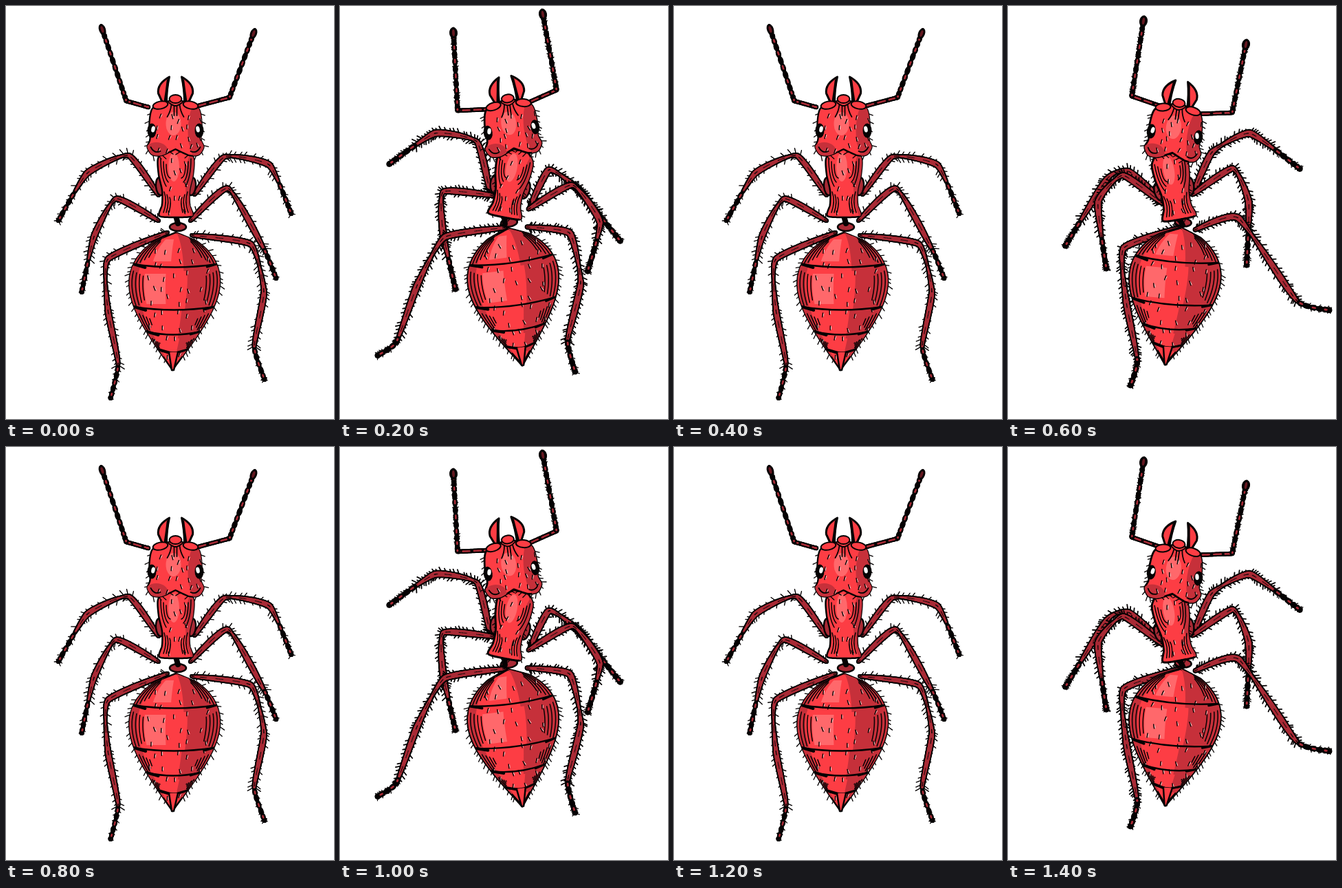
Write an HTML page with a canvas that moves like this. It is 477 by 600 pixels and loops after 1.6 s.

```html
<!DOCTYPE html>
<html lang="en">
<head>
<meta charset="utf-8">
<title>Walking ant</title>
<style>
html, body { margin: 0; width: 100%; height: 100%; overflow: hidden; background: #fff; }
canvas { display: block; }
</style>
</head>
<body>
<canvas id="stage" width="477" height="600"></canvas>
<script>
const g = document.getElementById('stage').getContext('2d');
const RED = '#fd3d44', DARK = '#c6303a', LIGHT = '#ff686b', LEG = '#a92b36', INK = '#050203';
const STEP = 200, ORDER = [0, 1, 0, 2], FOOT = 48;

// Body parts are [x, y, degrees]; limbs list their joints from the body to the tip.
const poses = [
  {
    head: [246.5, 181, 0], thorax: [247, 258, 0], abdomen: [247, 329, 0], rough: 0,
    antennae: ['207,147 175,138 140,34', '272,147 325,133 360,40'],
    legs: [
      '222,275 178,217 118,243 76,312', '274,274 318,219 383,231 415,302',
      '222,312 160,280 128,335 110,416', '268,312 323,265 376,355 393,396',
      '235,329 148,368 148,440 163,520 152,570', '270,333 356,346 375,415 361,495 376,543']
  },
  {
    head: [249.5, 180, -7], thorax: [248, 259, 11], abdomen: [244, 323, -7.5], rough: 1,
    antennae: ['215,150 171,152 165,39', '270,142 315,122 295,12'],
    legs: [
      '218,270 199,197 138,185 71,230', '276,292 304,238 346,266 408,342',
      '222,275 150,270 150,330 168,412', '274,295 338,260 378,314 360,386',
      '240,322 152,336 113,404 82,488 54,508', '272,321 334,330 350,402 331,486 342,532']
  },
  {
    head: [242.5, 186.5, 7.5], thorax: [241, 262, -10], abdomen: [251, 322, 5], rough: 1,
    antennae: ['232,149 180,131 197,22', '274,157 326,155 346,56'],
    legs: [
      '225,283 175,240 145,250 83,349', '270,270 297,212 352,185 425,237',
      '225,287 167,246 131,285 143,382', '268,274 327,236 350,285 347,377',
      '250,322 168,352 172,430 188,515 178,552', '272,325 335,308 420,428 468,442']
  }
];

const points = s => s.split(' ').map(p => p.split(',').map(Number));
const wave = t => Math.abs(Math.sin(t * Math.PI));

let seed;
function rnd() {
  seed = (seed * 16807) % 2147483647;
  return seed / 2147483647;
}

// Samples a curve through the points about once per pixel as [x, y, dx, dy].
function spline(p, bend = .25) {
  const out = [];
  for (let i = 0; i < p.length - 1; i++) {
    const a = p[i], b = p[i + 1], before = p[i - 1] || a, after = p[i + 2] || b;
    const n = Math.ceil(Math.hypot(b[0] - a[0], b[1] - a[1]));
    for (let k = 0; k < n; k++) {
      const t = k / n, u = 1 - t;
      out.push([0, 1].map(c => {
        const m = (b[c] - before[c]) * bend, q = (after[c] - a[c]) * bend;
        return a[c] * u * u * (1 + 2 * t) + m * t * u * u + b[c] * t * t * (3 - 2 * t) - q * t * t * u;
      }));
    }
  }
  out.push([...p[p.length - 1]]);
  out.forEach((s, i) => {
    const a = out[Math.max(0, i - 1)], b = out[Math.min(out.length - 1, i + 1)];
    const d = Math.hypot(b[0] - a[0], b[1] - a[1]) || 1;
    s.push((b[0] - a[0]) / d, (b[1] - a[1]) / d);
  });
  return out;
}

const trace = p => new Path2D('M' + p.map(s => s[0] + ' ' + s[1]).join('L'));
const mirrored = side => trace([...side, ...side.map(([x, y]) => [-x, y]).reverse()]);

// The abdomen swells and tapers: t runs from waist to sting, u from -1 (left) to 1 (right).
const belly = (t, u) => [u * 66 * Math.sin(Math.PI * t ** .68) - 5 * t, 200 * t];
const edge = (u, from = 0, to = 1) =>
  spline(Array.from({ length: 17 }, (_, i) => belly(from + (to - from) * i / 16, u)));

const headSide = spline(points('0,-50 10,-43 33,-33 38,-12 37,12 41,24 34,35 20,36 0,27'), .4);
const thoraxSide = spline(points('0,-51 16,-50 26,-36 25,-13 20,10 20,30 24,47 0,49'), .4);
const HEAD = mirrored(headSide), THORAX = mirrored(thoraxSide);
const ABDOMEN = trace([...edge(-1), ...edge(1).reverse()]);

function stroke(path, width = 1.5, color = INK) {
  g.strokeStyle = color;
  g.lineWidth = width;
  g.stroke(path);
}

function fill(path, color) {
  g.fillStyle = color;
  g.fill(path);
}

function shape(path, color, width = 2.5) {
  fill(path, color);
  stroke(path, width);
}

const line = (x1, y1, x2, y2, width, color) => stroke(trace([[x1, y1], [x2, y2]]), width, color);

function oval(x, y, rx, ry, color, width = 0, turn = 0) {
  const p = new Path2D();
  p.ellipse(x, y, rx, ry, turn, 0, 7);
  fill(p, color);
  if (width) stroke(p, width);
}

function tube(path, radius, color) {
  path.forEach(([x, y], i) => {
    const r = radius(i / path.length, i);
    if (r > 0) oval(x, y, r, r, color);
  });
}

function hairs(path, gap, reach, sides, width = 1.3) {
  for (let i = 4; i < path.length; i += gap * (.6 + .8 * rnd())) {
    const [x, y, dx, dy] = path[i | 0];
    for (const s of sides) {
      const l = reach * (.6 + .6 * rnd()), f = l * .6;
      line(x, y, x - dy * s * l + dx * f, y + dx * s * l + dy * f, width);
    }
  }
}

// Short bristles scattered on a loose grid, each with a pale glint.
function bristles(x0, y0, x1, y1, gap) {
  for (let y = y0; y < y1; y += gap)
    for (let x = x0; x < x1; x += gap) {
      const px = x + rnd() * gap * .7, py = y + rnd() * gap * .7, lean = rnd() * 5 - 2.5;
      line(px + 1.3, py + 1, px + lean + 1.3, py + 5, 1, '#ffd9d6');
      line(px, py, px + lean, py + 6, 1.4);
    }
}

function beads(path, r) {
  tube(path, (t, i) => r * (.55 + .45 * wave(i / 8)), INK);
  tube(path, (t, i) => i % 16 > 2 && i % 16 < 7 ? r * .33 : 0, LEG);
}

function leg(joints, rough) {
  const path = spline(points(joints)), cut = path.length - FOOT;
  const limb = path.slice(0, cut), foot = path.slice(cut);
  const r = t => 3 + 2.3 * wave(t * 2) + rough * .4;
  hairs(limb, rough ? 5 : 8, 8, [1, -1], 1.4 + rough * .4);
  hairs(foot, rough ? 4 : 8, 5, [1, -1]);
  tube(limb, r, INK);
  tube(limb, t => r(t) - 2, LEG);
  tube(limb, (t, i) => i % 19 < 9 ? .6 : 0, INK);
  beads(foot, 3.7 + rough * .4);
}

function antenna(joints, rough) {
  const [base, elbow, tip] = points(joints);
  const scape = spline([base, elbow]), whip = spline([elbow, tip]);
  const turn = Math.atan2(tip[1] - elbow[1], tip[0] - elbow[0]);
  if (rough) hairs(whip, 4, 4, [1, -1]);
  tube(scape, () => 3.3, INK);
  tube(scape, (t, i) => i % 13 < 9 ? 1.3 : 0, LEG);
  beads(whip, 3.8);
  oval(...tip, 8, 4.5 + rough, INK, 1, turn);
  oval(...tip, 5, 2, '#641820', 0, turn);
}

function part([x, y, deg], draw, rough) {
  g.save();
  g.translate(x, y);
  g.rotate(deg * Math.PI / 180);
  draw(rough);
  g.restore();
}

function inside(path, draw) {
  g.save();
  g.clip(path);
  draw();
  g.restore();
}

function both(draw) {
  for (const side of [1, -1]) {
    g.save();
    g.scale(side, 1);
    draw();
    g.restore();
  }
}

const zone = (t0, t1, u0, u1, color) =>
  fill(trace([...edge(u0, t0, t1), ...edge(u1, t0, t1).reverse()]), color);

function abdomen(rough) {
  const bands = [0, .25, .56, .74, .87];
  oval(3, -8, 12, 6, LEG, 2.5);
  for (const u of [1, -1]) hairs(edge(u, .08, .93), 9 - 2 * rough, 6, [-u]);
  shape(ABDOMEN, RED, 2.5 + rough);
  inside(ABDOMEN, () => {
    for (let i = 0; i < 4; i++) {
      const [top, end] = [bands[i], bands[i + 1]];
      zone(top, end + .03, i % 2 ? .28 : .2, 1, DARK);
      zone(top, end + .03, -1, -.82, DARK);
      if (i < 2) zone(top + .05, end - .04, -.55 - i * .12, -.1 - i * .1, LIGHT);
      for (let k = 0; k < 4; k++)
        for (const u of [1, -1])
          stroke(trace(edge(u * (.94 - k * .08), top + .03 + k * .012, end - .015 - k * .018)), 1.5);
    }
    bristles(-42, 14, 48, 178, 19);
    for (const t of bands.slice(1)) {
      const [l, m, r] = [belly(t - .02, -1), belly(t + .025, 0), belly(t - .02, 1)];
      stroke(new Path2D(`M${l}Q${m} ${r}`), 2.4);
      line(...l, l[0] + 17, l[1] + 5, 4);
      line(...r, r[0] - 14, r[1] + 4, 3);
    }
  });
  shape(new Path2D('M-10 174L-6 200H-3L3 174'), RED, 2.5);
}

function thorax(rough) {
  line(0, 47, 3, 58, 8);
  both(() => {
    oval(23, 4, 6, 13, LEG, 2.5, .1);
    if (rough) hairs(thoraxSide, 8, 4, [-1]);
  });
  shape(THORAX, RED, 2.5 + rough * .5);
  inside(THORAX, () => {
    oval(27, 0, 13, 50, DARK);
    oval(-3, -24, 8, 21, LIGHT);
    bristles(-13, -40, 16, 40, 17);
    both(() => {
      for (let i = 0; i < 3; i++)
        stroke(new Path2D(`M${22 - i * 4} ${i * 4 - 36}Q${22 - i * 4} -10 ${14 - i * 3} ${4 - i * 6}M${17 - i * 4} ${12 + i * 4}Q${12 - i * 3} 26 ${18 - i * 4} 42`));
    });
  });
}

function head(rough) {
  both(() => {
    shape(new Path2D('M-9 -78Q-27 -68 -25 -54L-19 -41H-13Q-13 -60 -9 -78Z'), RED, 3);
    stroke(new Path2D('M-11 -73Q-13 -57 -15 -44'), 3.5);
    hairs(headSide.slice(45), 9 - 2 * rough, 6, [-1]);
  });
  shape(HEAD, RED, 2.3 + rough * .5);
  inside(HEAD, () => {
    oval(36, 0, 18, 45, DARK);
    oval(-28, 30, 17, 13, DARK);
    oval(-3, -10, 11, 17, LIGHT);
    bristles(-27, -25, 30, 30, 14);
  });
  both(() => {
    oval(22, -37, 11, 5.5, RED, 2, .2);
    stroke(new Path2D('M10 -41Q4 -36 0 -36M6 -38Q7 -28 12 -20M2 -36V-22M22 30Q31 34 36 24'), 1.8);
    oval(34.5, 0, 6.5, 10.5, INK);
    oval(32.5, -2, 2.7, 4.5, '#fff', 0, -.2);
  });
  oval(0, -46, 9, 6, RED, 2);
}

function draw({ legs, antennae, rough, ...body }) {
  seed = 4271;
  g.fillStyle = '#fff';
  g.fillRect(0, 0, 477, 600);
  g.lineCap = g.lineJoin = 'round';
  legs.forEach(l => leg(l, rough));
  antennae.forEach(a => antenna(a, rough));
  part(body.abdomen, abdomen, rough);
  part(body.thorax, thorax, rough);
  part(body.head, head, rough);
}

let shown = -1;
const start = performance.now();
function tick() {
  const i = ORDER[Math.floor((performance.now() - start) / STEP) % ORDER.length];
  if (i !== shown) draw(poses[shown = i]);
  requestAnimationFrame(tick);
}
tick();
</script>
</body>
</html>
```
